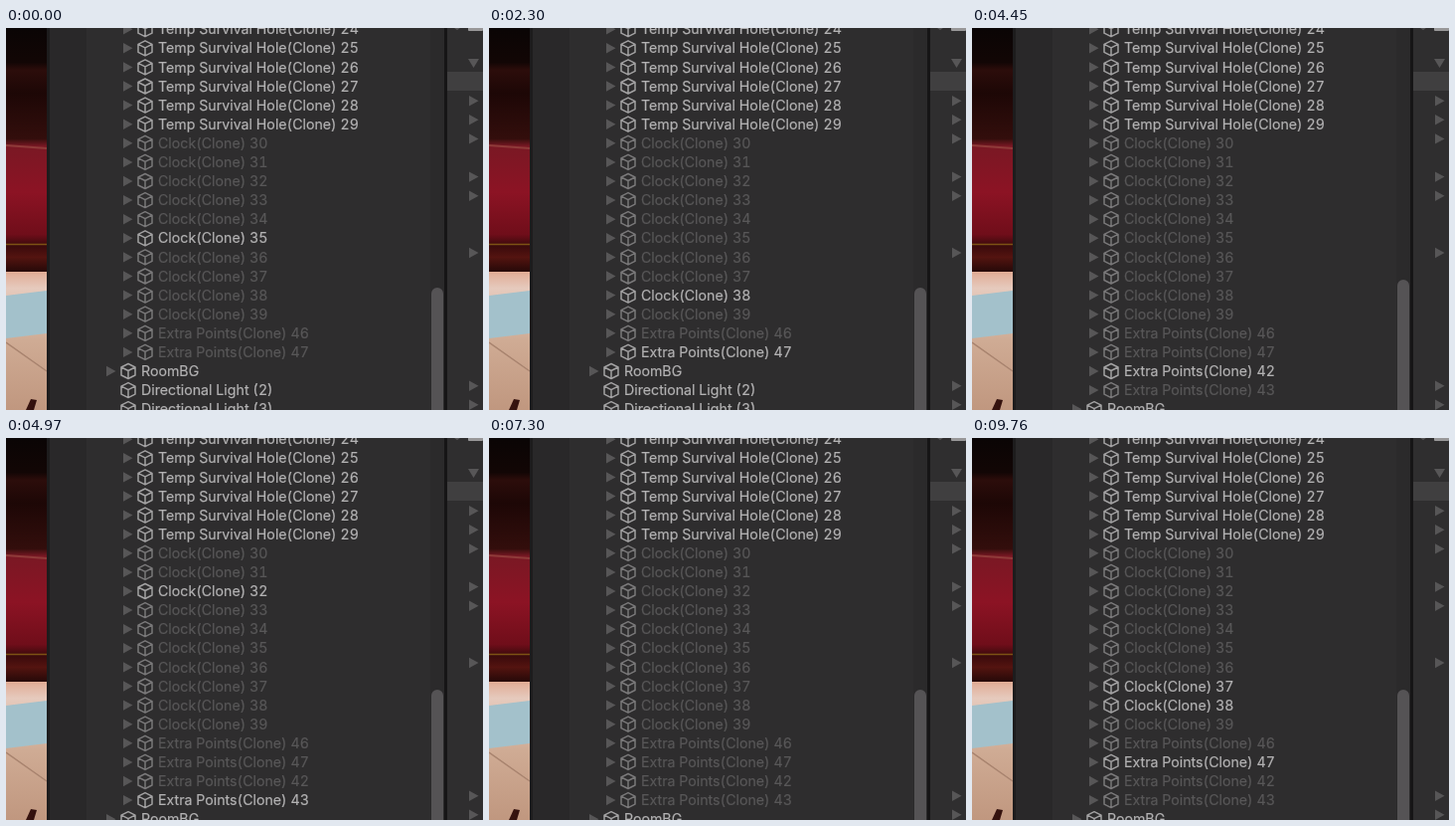
Recreate the animation shown at these times as an HTML page. Size 480 by 384 pixels, loop 10000 ms.

```html
<!DOCTYPE html>
<html lang="en">
<head>
<meta charset="utf-8">
<title>Object pool hierarchy</title>
<style>
  html, body { margin: 0; width: 100%; height: 100%; overflow: hidden; background: #2e2d2e; }
  svg { display: block; width: 480px; height: 384px; }
  text {
    font: 14.2px Inter, Arial, sans-serif; font-variant-numeric: tabular-nums;
    fill: #b3b2b3; stroke: #b3b2b3; stroke-width: .2;
  }
  .cube { fill: none; stroke: #a3a2a3; stroke-width: 1.5; stroke-linejoin: round; }
  .arrow { fill: #575657; }
  .off text { fill: #585758; stroke: #585758; }
  .off .cube { stroke: #7a797a; }
</style>
</head>
<body>
<svg viewBox="0 0 480 384">
  <defs>
    <linearGradient id="stage" gradientUnits="userSpaceOnUse" x1="0" x2="0" y1="0" y2="384">
      <stop offset="0" stop-color="#0a0505"/>
      <stop offset=".09" stop-color="#120605"/>
      <stop offset=".11" stop-color="#2c0d0b"/>
      <stop offset=".17" stop-color="#1d0706"/>
      <stop offset=".29" stop-color="#330e0c"/>
      <stop offset=".31" stop-color="#7a1824"/>
      <stop offset=".43" stop-color="#8c1324"/>
      <stop offset=".54" stop-color="#700e1a"/>
      <stop offset=".57" stop-color="#3a0a0c"/>
      <stop offset=".6" stop-color="#541410"/>
      <stop offset=".64" stop-color="#230808"/>
    </linearGradient>
    <linearGradient id="floor" x2="0" y2="1">
      <stop offset="0" stop-color="#e0ab94"/>
      <stop offset=".12" stop-color="#e6cabd"/>
      <stop offset=".5" stop-color="#cfab94"/>
      <stop offset="1" stop-color="#c0977f"/>
    </linearGradient>
  </defs>

  <rect width="41" height="245" fill="url(#stage)"/>
  <path d="M0 118 41 121" stroke="#8f3a39" stroke-width="2"/>
  <path d="M0 217.5H41" stroke="#7d5214" stroke-width="1.5"/>
  <rect y="245" width="41" height="139" fill="url(#floor)"/>
  <path d="M0 269 41 264V307L0 312Z" fill="#a3c1cb"/>
  <path d="M0 316 41 345" stroke="#a8836e" stroke-width="1.5"/>
  <path d="M20 384 25 373 31 374 28 384Z" fill="#35120e"/>

  <rect x="41" width="40" height="384" fill="#292829"/>
  <rect x="41" width="3" height="384" fill="#1d1c1d"/>
  <rect x="81" width="346" height="384" fill="#2e2d2e"/>
  <g id="rows"></g>

  <rect x="427" width="14" height="384" fill="#2b2a2b"/>
  <rect id="thumb" x="428" width="12" height="200" rx="6" fill="#555355"/>
  <rect x="441" width="3" height="384" fill="#161516"/>
  <rect x="444" width="36" height="384" fill="#2f2e2f"/>
  <rect x="444" y="44" width="36" height="19" fill="#403f40"/>
  <path class="arrow" d="M465 31H476L470.500 40Z"/>
  <path class="arrow" d="M451 0H457L454 2Z"/>
  <rect x="465" y="-4" width="15" height="7" rx="1" fill="#989798"/>
  <g id="side"></g>
</svg>
<script>
const LOOP = 10000, LIFE = 800, PITCH = 19.1, FIRST_Y = 1.2;

// Spawn moments in ms; every spawn takes the next object of its pool for LIFE ms.
const clockSpawns = [-350, 940, 1270, 1970, 2600, 3300, 3450, 4840, 5700, 6330, 7640, 8600, 9300, 9760];
const pointSpawns = [60, 1400, 2300, 2650, 3330, 4150, 4970, 5970, 6000, 7640, 8450, 8650, 9600];
const SMALL_POOL_USES = 5;
const growAt = pointSpawns[SMALL_POOL_USES];

const clockNumber = k => 30 + (k + 5) % 10;
const pointNumber = k => k < SMALL_POOL_USES ? 47 - k % 2 : [42, 43, 46, 47][(k - SMALL_POOL_USES) % 4];

const $ = id => document.getElementById(id);
const arrow = (x, y) => `<path class="arrow" d="M${x} ${y - 5.2}V${y + 5.2}L${x + 9.5} ${y}Z"/>`;
const cube = x => `<path class="cube" d="M${x} -7.500l7 3.500v8l-7 3.500l-7 -3.500v-8zM${x - 7} -4l7 3.500l7 -3.500M${x} -.5v8"/>`;

const rows = [];
function addRow(label, x, hasArrow, pooled = {}) {
  const el = document.createElementNS("http://www.w3.org/2000/svg", "g");
  el.innerHTML = (hasArrow ? arrow(x - 35, 0) : "") + cube(x - 13) +
    `<text x="${x}" y="5.1">${label}</text>`;
  $("rows").append(el);
  rows.push({ el, ...pooled });
}

function addPooled(name, number, spawns, numberOf, late = false) {
  const starts = spawns.filter((_, k) => numberOf(k) === number);
  addRow(`${name}(Clone) ${number}`, 153, true, { starts, late });
}

for (let n = 24; n < 30; n++) addRow(`Temp Survival Hole(Clone) ${n}`, 153, true);
for (let n = 30; n < 40; n++) addPooled("Clock", n, clockSpawns, clockNumber);
for (const n of [46, 47, 42, 43]) addPooled("Extra Points", n, pointSpawns, pointNumber, n < 46);
addRow("RoomBG", 136, true);
for (const n of [2, 3]) addRow(`Directional Light (${n})`, 136, false);

$("side").innerHTML = [2, 3, 4, 6, 7, 10, 17, 18].map(i => arrow(466, 35 + PITCH * i)).join("");

function draw(t) {
  const grown = t >= growAt;
  let y = FIRST_Y;
  for (const { el, starts, late } of rows) {
    const shown = grown || !late;
    const active = !starts || starts.some(start => t >= start && t < start + LIFE);
    el.style.display = shown ? "" : "none";
    el.setAttribute("class", active ? "" : "off");
    el.setAttribute("transform", `translate(0 ${y.toFixed(1)})`);
    if (shown) y += PITCH;
  }
  $("thumb").setAttribute("y", grown ? 253 : 261);
}

function frame() {
  draw(performance.now() % LOOP);
  requestAnimationFrame(frame);
}
frame();
</script>
</body>
</html>
```
